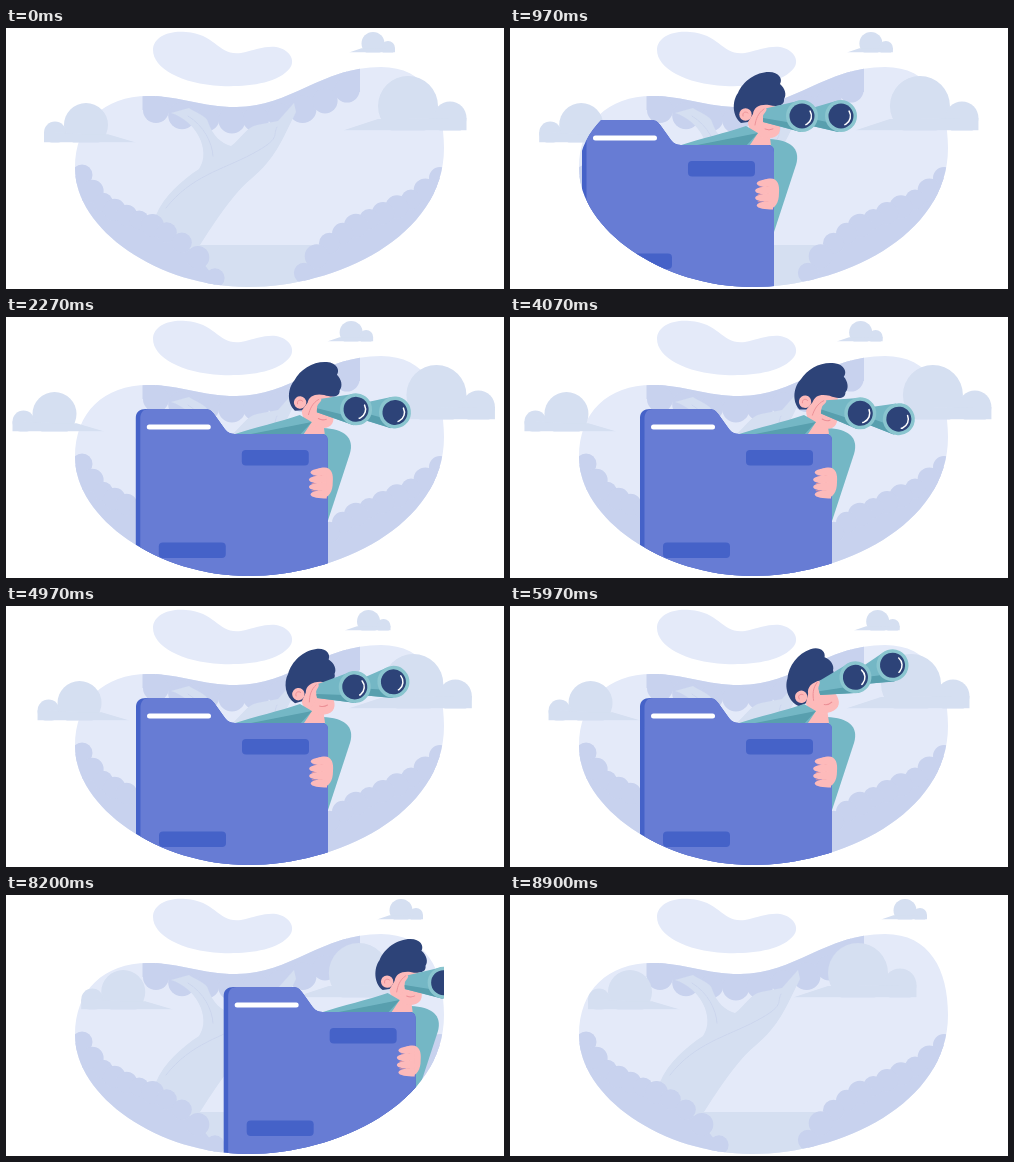
Recreate the animation shown at these times as an HTML page with a canvas. Size 498 by 261 pixels, loop 9010 ms.

```html
<!DOCTYPE html>
<html lang="en">
<head>
<meta charset="utf-8">
<title>Lookout</title>
<style>
html, body { margin: 0; width: 100%; height: 100%; overflow: hidden; background: #fff; }
canvas { display: block; width: 498px; height: 261px; }
</style>
</head>
<body>
<canvas id="stage" width="498" height="261"></canvas>
<script>
const ctx = document.getElementById('stage').getContext('2d');
const LOOP = 9010, TURN = Math.PI * 2;
const C = {
  pale: '#e4eaf9', leaf: '#c8d2ee', cloud: '#d5dff1', bark: '#c9d4ec',
  folder: '#677cd4', deep: '#4562c8', teal: '#74b7c5', tealDark: '#589fae',
  ring: '#8ac5cf', navy: '#2d4378', skin: '#fdbaba', crease: '#ec8f96'
};

const BOWL = 'C438 209 330 259 242 259 C153 259 69 202 69 140Z';
const island = new Path2D('M69 140 C69 95 98 68 142 68 C175 68 195 79 230 79 C285 79 315 39 375 39 C420 39 438 75 438 120 ' + BOWL);
// Open above, so the person can rise over the island's top edge.
const opening = new Path2D('M69 140 C70 119 79 105 92 91 V-10 H438 V120 ' + BOWL);

function fill(path, color) {
  ctx.fillStyle = color;
  ctx.fill(typeof path === 'string' ? new Path2D(path) : path);
}
function line(d, color, width) {
  ctx.strokeStyle = color;
  ctx.lineWidth = width;
  ctx.lineCap = 'round';
  ctx.stroke(new Path2D(d));
}
function disc(x, y, r, color) {
  ctx.fillStyle = color;
  ctx.beginPath();
  ctx.arc(x, y, r, 0, TURN);
  ctx.fill();
}
function bar(x, y, w, h, r, color) {
  ctx.fillStyle = color;
  ctx.beginPath();
  ctx.roundRect(x, y, w, h, r);
  ctx.fill();
}
function turned(x, y, deg, paint) {
  ctx.save();
  ctx.translate(x, y);
  ctx.rotate(deg * Math.PI / 180);
  ctx.translate(-x, -y);
  paint();
  ctx.restore();
}

// Sine-eased track through [time, value] pairs.
function track(t, keys) {
  if (t <= keys[0][0]) return keys[0][1];
  for (let i = 1; i < keys.length; i++) {
    const [t0, a] = keys[i - 1], [t1, b] = keys[i];
    if (t < t1) return a + (b - a) * (1 - Math.cos(Math.PI * (t - t0) / (t1 - t0))) / 2;
  }
  return keys[keys.length - 1][1];
}

function slide(t) {
  if (t < 2700) return -345 * (1 - t / 2700) ** 4;
  if (t > 7500) return 330 * ((t - 7500) / 1360) ** 2;
  return 0;
}

// Leaf bumps strung along a cubic curve, filled from there to the line y = far.
function foliage(a, b, c, d, count, size, far) {
  const at = (u, k) => (1 - u) ** 3 * a[k] + 3 * u * (1 - u) ** 2 * b[k] + 3 * u * u * (1 - u) * c[k] + u ** 3 * d[k];
  const body = new Path2D();
  body.moveTo(a[0], far);
  body.lineTo(...a);
  body.bezierCurveTo(...b, ...c, ...d);
  body.lineTo(d[0], far);
  fill(body, C.leaf);
  for (let i = 0; i < count; i++) {
    const u = i / (count - 1);
    disc(at(u, 0), at(u, 1), size + Math.sin(i * 2.3), C.leaf);
  }
}

function scenery() {
  fill('M147 22 C147 8 165 2 180 4 C210 6 212 28 235 25 C250 22 258 18 270 19 C283 21 290 32 284 40 C272 56 240 59 215 58 C175 56 147 40 147 22Z', C.pale);
  fill(island, C.pale);
  ctx.save();
  ctx.clip(island);
  foliage([150, 82], [220, 100], [283, 94], [341, 62], 9, 13, 36);
  bar(136.5, 40, 20, 42, 0, C.leaf);
  bar(335, 30, 19, 34, 0, C.leaf);
  fill('M192 217 H316 L288 262 H200Z', C.cloud);
  fill('M165 85 L183 80 C188 84 201 88 202 94 C207 108 215 115 225 118 C235 111 240 99 251 97 L272 93 L288 75 L290 84 C276 112 270 130 245 151 Q226 166 194 217 V245 L150 187 C158 168 176 152 193 141 C206 122 189 92 165 85Z', C.cloud);
  line('M182 88 C198 98 206 114 207 128 M160 180 C185 148 216 142 246 126 S266 108 271 99', C.bark, 0.8);
  foliage([76, 147], [110, 210], [150, 170], [209, 250], 11, 10.5, 262);
  foliage([434, 150], [385, 196], [340, 182], [298, 245], 11, 11, 262);
  bar(60, 148, 17, 114, 0, C.leaf);
  bar(433, 150, 12, 112, 0, C.leaf);
  ctx.restore();
}

// A main puff, a smaller one beside it and a thin tip on the other side.
function cloud(dx, base, x, y, r, bx, by, br, tip) {
  const s = Math.sign(bx - x), end = bx + s * br;
  ctx.save();
  ctx.translate(dx, 0);
  ctx.beginPath();
  ctx.rect(-100, -20, 700, base + 20);
  ctx.clip();
  disc(x, y, r, C.cloud);
  disc(bx, by, br, C.cloud);
  fill(`M${tip} ${base} L${x - s * r} ${base - r * 0.38} H${x} L${bx} ${by} H${end} V${base}Z`, C.cloud);
  ctx.restore();
}

function lens(x, y) {
  disc(x, y, 16, C.ring);
  disc(x, y, 12.5, C.navy);
  ctx.strokeStyle = '#fff';
  ctx.lineWidth = 1.5;
  ctx.lineCap = 'round';
  ctx.beginPath();
  ctx.arc(x, y, 9.5, -0.55, 1.15);
  ctx.stroke();
}

function head() {
  fill('M296 76 H325 L327 94 C330 103 327 110 317 110 C307 110 298 105 296 96Z', C.skin);
  line('M313 101 Q317 103 321 101', C.crease, 1);
  fill('M289 95 C280 88 280 73 286 65 C291 53 304 44 317 44 C327 44 331 51 328 56 C333 60 335 67 332 71 C333 78 325 79 317 77 C308 76 302 79 301 86 L296 94Z', C.navy);
  disc(293.5, 86.5, 6.2, C.skin);
  line('M291 88 C290 84 294 83 296 85', C.crease, 0.9);
}

function binoculars() {
  fill('M360 80 L384 73 L387 104 L360 98Z', C.teal);
  fill('M360 91 L386 96 V104 L360 98Z', C.tealDark);
  lens(389, 88);
  fill('M311 81 L346 73 L349 104 L311 94Z', C.teal);
  fill('M311 90 L347 96 L349 104 L311 94Z', C.tealDark);
  lens(350, 88);
  fill('M297 96 C300 88 306 80 314 80 C317 83 308 86 311 94 C308 100 303 105 299 103Z', C.skin);
  line('M312 81 C306 85 304 91 303 97', C.crease, 0.9);
}

function person(deg) {
  fill('M296 117 L317 111 C338 112 349 120 344 137 L322 204 H310Z', C.teal);
  fill('M297 102 H317 L319 117 H294Z', C.skin);
  turned(306, 96, deg, head);
  turned(295, 94, deg, binoculars);
  fill('M226 118 C250 110 274 105 294 98 L306 105 L298 117Z', C.teal);
  fill('M240 118 L306 105 L294 118Z', C.tealDark);
}

function folder() {
  const edge = 'H199 C204 92 206 94 209 98 L219 112 C222 116 225 117 231 117 H315 C320 117 322 119 322 124 V262Z';
  fill('M130 262 V101 C130 95 134 92 140 92 ' + edge, C.deep);
  fill('M134.5 262 V102 C134.5 96 137 92 143 92 ' + edge, C.folder);
  bar(141, 107.5, 64, 5, 2.5, '#fff');
  bar(236, 133, 67, 15.5, 4, C.deep);
  bar(153, 225.5, 67, 15.5, 4, C.deep);
}

function hand() {
  fill('M312 152 C325 147 328 156 327 165 C327 175 323 182 314 181 L311 168Z', C.skin);
  for (let i = 0; i < 4; i++) {
    const y = 155.5 + i * 7.3, x = 303 + (i - 1.5) ** 2 * 0.8;
    fill(`M${x} ${y} C${x} ${y - 3} ${x + 9} ${y - 5} 321 ${y - 4} V${y + 4} C${x + 9} ${y + 4} ${x} ${y + 3} ${x} ${y}Z`, C.skin);
    if (i < 3) line(`M${x + 3} ${y + 3.6} Q${x + 8} ${y + 5} 316 ${y + 3.6}`, C.crease, 0.9);
  }
}

function draw(t) {
  ctx.clearRect(0, 0, 498, 261);
  scenery();
  cloud(track(t, [[0, 0], [2950, -36], [5750, 0], [8700, 40]]), 114.5, 80, 97, 22, 49, 104.5, 11, 130);
  cloud(track(t, [[0, 0], [2950, 32.5], [5700, 0], [8800, -54]]), 102.5, 402, 78, 30, 444, 90, 16.5, 337);
  cloud(track(t, [[0, 0], [2950, -25], [5750, 0], [7950, 28]]), 24.5, 367, 15.5, 11.5, 382, 20, 7, 343);
  ctx.save();
  ctx.clip(opening);
  ctx.translate(slide(t), 0);
  person(track(t, [[1300, 0], [3300, 9.5], [3850, 9.5], [5800, -18], [6200, -18], [8400, 0]]));
  folder();
  hand();
  ctx.restore();
}

const start = performance.now();
function tick() {
  draw((performance.now() - start) % LOOP);
  requestAnimationFrame(tick);
}
tick();
</script>
</body>
</html>
```
